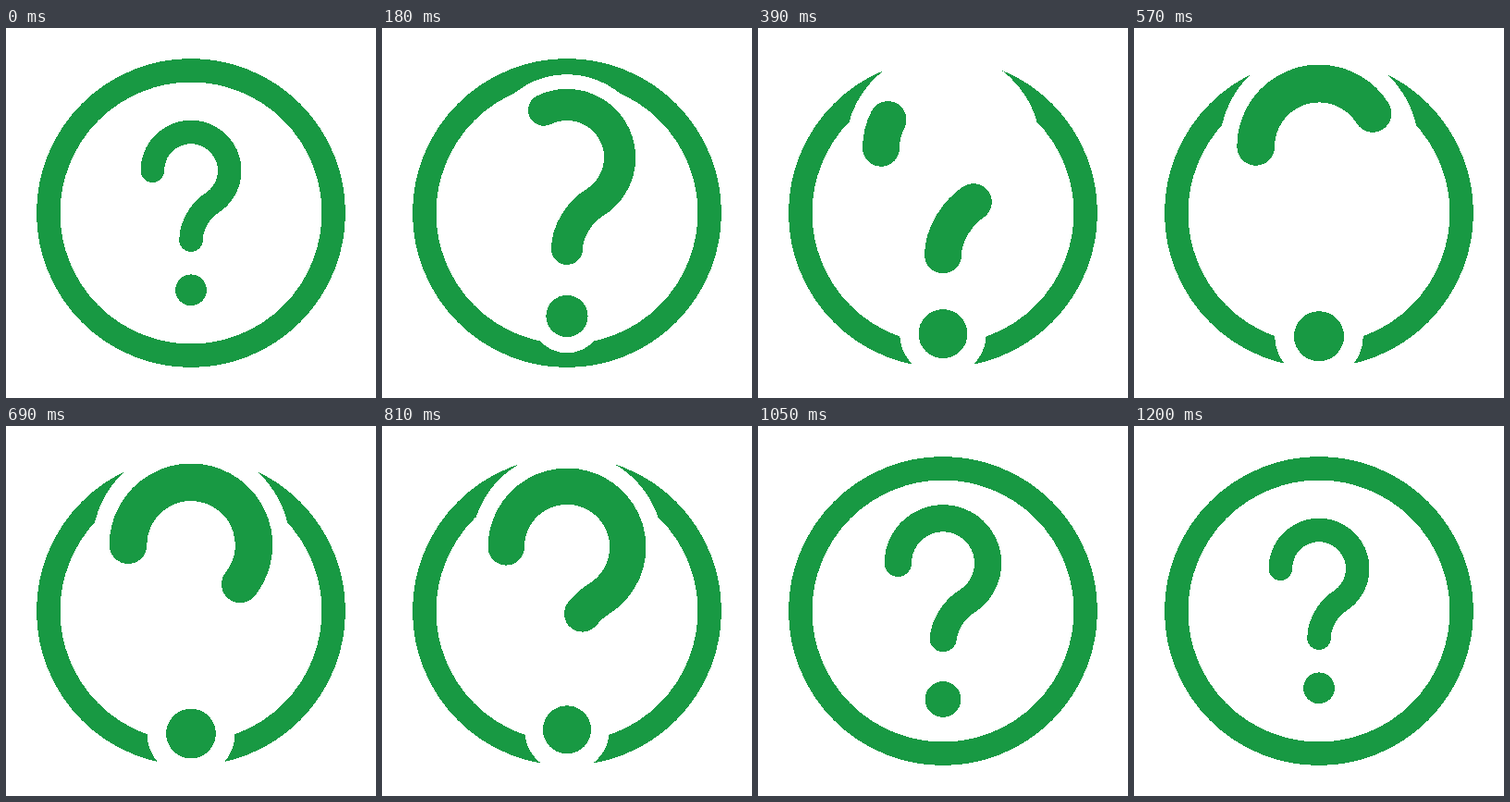
Recreate the animation shown at these times as an HTML page. Size 400 px wide and 400 px high, loop 3.23 s.

```html
<!DOCTYPE html>
<html lang="en">
<head>
<meta charset="utf-8">
<title>Question mark</title>
<style>
  html, body { margin: 0; width: 100%; height: 100%; overflow: hidden; background: #fff; }
  svg { display: block; width: 100%; height: 100%; shape-rendering: crispEdges; }
  path, .ring { fill: none; stroke: #189943; stroke-width: 25.5; stroke-linecap: round; }
  .dot { fill: #189943; }
  .halo path { stroke: #fff; stroke-width: 49; }
  .halo circle { fill: #fff; }
</style>
</head>
<body>
<svg viewBox="0 0 400 400">
  <circle class="ring" cx="200" cy="200" r="154.2"/>
  <g id="mark">
    <g class="halo">
      <path/>
      <circle cy="83.3" r="29.8"/>
    </g>
    <path id="head" pathLength="1"/>
    <path id="tail" pathLength="1"/>
    <circle class="dot" cy="83.3" r="16.9"/>
  </g>
</svg>
<script>
const LOOP = 3230, STEP = 30, END = 1200;
const mark = document.getElementById('mark');
const head = document.getElementById('head');
const tail = document.getElementById('tail');
const paths = mark.querySelectorAll('path');

// cubic-bezier(x1, 0, x2, 1), solved by bisection
function ease(x, x1, x2) {
  if (x <= 0) return 0;
  if (x >= 1) return 1;
  let lo = 0, hi = 1, u;
  for (let i = 0; i < 24; i++) {
    u = (lo + hi) / 2;
    const v = 1 - u;
    if (3 * u * v * (v * x1 + u * x2) + u * u * u < x) lo = u; else hi = u;
  }
  return u * u * (3 - 2 * u);
}

// hook of radius r, then the curved stem
function outline(r) {
  const cy = r - 87.5, a = 58.7 * Math.PI / 180;
  const c = Math.cos(a), s = Math.sin(a);
  const x = r * c, y = cy + r * s;
  return `M${-r} ${cy}A${r} ${r} 0 1 1 ${x} ${y}` +
         `C${x - 13 * s} ${y + 13 * c} 0 14 0 29.2`;
}

function trim(path, from, to) {
  path.style.display = to - from > 0.001 ? '' : 'none';
  path.setAttribute('stroke-dasharray', `${to - from} 3`);
  path.setAttribute('stroke-dashoffset', -from);
}

function draw(now) {
  const t = Math.min(END, Math.floor(now % LOOP / STEP) * STEP);
  const grow = t < 600 ? ease(t / 595, 0.42, 0) : ease((END - t) / 600, 0.37, 0.25);
  const size = 1 + 0.6 * grow;
  const d = outline(41.7 + Math.min(1, 3 * grow));
  paths.forEach(p => p.setAttribute('d', d));
  mark.setAttribute('transform', `translate(200 200) scale(${size})`);
  trim(head, 0, ease((t - 228) / 972, 0.38, 0.23));
  trim(tail, ease(t / 562, 0.42, 0.58), 1);
}

let start;
function tick(now) {
  start ??= now;
  draw(now - start);
  requestAnimationFrame(tick);
}
draw(0);
requestAnimationFrame(tick);
</script>
</body>
</html>
```
